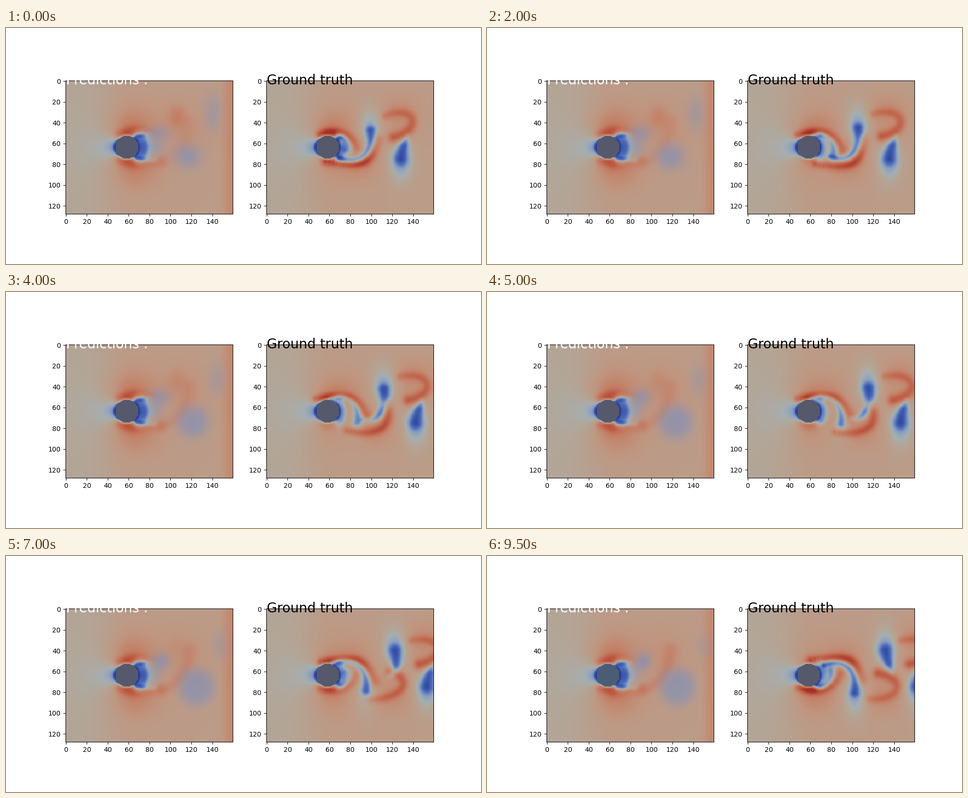
Animation of 989x494 px, one loop 10000 ms. Source, as a matplotlib script:

```python
import numpy as np
import matplotlib.pyplot as plt
from matplotlib.animation import FuncAnimation
from matplotlib.colors import LinearSegmentedColormap

W, H, DPI = 989, 494, 100
FRAMES, INTERVAL = 20, 500
NX, NY = 160, 128
CX, CY, RADIUS = 58, 63.5, 11
SHEDDING = 17  # frames between two eddies, which leave on alternate sides
SPACING = 30   # distance between them downstream

plt.rcParams["font.family"] = "DejaVu Sans"

CMAP = LinearSegmentedColormap.from_list("flow", [
    (0, "#283e94"), (.2, "#4c6aba"), (.35, "#869ec2"), (.45, "#a6aeb1"),
    (.5, "#b2a799"), (.625, "#c09680"), (.75, "#c47a60"), (.875, "#bc5842"),
    (1, "#a63026")], N=512)
HAZE = np.array((120, 143, 194)) / 255
BODY = np.array((86, 88, 108)) / 255
BLUE_BODY = np.array((74, 93, 116)) / 255

X, Y = np.meshgrid(np.arange(NX, dtype=float), np.arange(NY, dtype=float))
DX, DY = X - CX, Y - CY
R = np.hypot(DX, DY)
SOLID = R < RADIUS

# Key points (x, height on the eddy's own side) at ages 0, 1 and 2
RED_PATH = np.array([
    [(50, 12.5), (63, 14.5), (76, 10.5), (84, 1)],
    [(56, 14), (86, 16), (99, 9), (106, -6)],
    [(113, 27), (134, 25), (138, 14), (121, 4)]])
BLUE_PATH = np.array([
    [(69, 9.5), (74, 8.5), (77, 3.5), (77, -2.5)],
    [(69, 10.5), (86, 11.5), (97, 2), (99, -16)],
    [(134, 3), (132, -2), (130, -8), (128, -17)]])


def smoothstep(a, b, x):
    s = np.clip((x - a) / (b - a), 0, 1)
    return s * s * (3 - 2 * s)


def mix(a, b, t):
    return np.asarray(a) * (1 - t) + np.asarray(b) * t


def blob(x, y, sx, sy, power=1):
    q = ((X - x) / sx) ** 2 + ((Y - y) / sy) ** 2
    return np.exp(-(q / 2) ** power)


def stroke(points, widths, amps):
    """Soft tube along a cubic through four points."""
    s = np.linspace(0, 1, 32)
    coef = np.polyfit(np.linspace(0, 1, 4), points, 3)
    px, py = np.polyval(coef[:, 0], s), np.polyval(coef[:, 1], s)
    w = np.interp(s, [0, .5, 1], widths)
    a = np.interp(s, [0, .5, 1], np.clip(amps, .01, 1))
    cost = np.full(X.shape, 50.0)
    for x, y, wi, ai in zip(px, py, w, a):
        q = ((X - x) ** 2 + (Y - y) ** 2) / (2 * wi * wi) - np.log(ai)
        np.minimum(cost, q, out=cost)
    return np.exp(-cost)


def centre(x):
    """Middle line of the wake, which drifts upwards downstream."""
    return CY - 6.5 * smoothstep(98, 130, x)


def path(keys, age, side):
    """Quadratic between the keys, then plain drift with the stream."""
    t = np.clip(age / 2, 0, 1)
    p = (keys[0] * (1 - t) * (1 - 2 * t) + keys[1] * 4 * t * (1 - t)
         + keys[2] * t * (2 * t - 1))
    p[:, 0] += SPACING * max(age - 2, 0)
    p[:, 1] = centre(p[:, 0]) + side * p[:, 1]
    return p


def around_cylinder():
    """Potential flow with a thin slow layer on the wall."""
    r = np.maximum(R, RADIUS)
    p = -RADIUS ** 2 * (DX ** 2 - DY ** 2) / np.maximum(R, 1) ** 2 / r ** 2
    p *= np.where(p > 0, .45, np.where(DX > 0, .1, .85))
    skin = np.exp(-(np.maximum(R - RADIUS, 0) / 1.5) ** 2)
    return .02 + .14 * smoothstep(15, 65, X) + p - .6 * skin


BASE = around_cylinder()


def eddy(age, side):
    """Red shear layer and the blue eddy it wraps, with their wide halos."""
    late = np.clip(age - 1, 0, 1)
    red, blue = path(RED_PATH, age, side), path(BLUE_PATH, age, side)
    v = stroke(red, (2.8, 3.4, 4), (.45 - .2 * late, .65 - .3 * late,
                                    .35 + .2 * late))
    tail = .9 - .55 * smoothstep(1, 1.4, age)
    grow = 1 + .45 * late
    v -= stroke(blue, (2, 2.3 * grow, 3.4 * grow), (tail, .8, .7))

    x, y = red.mean(axis=0)
    v += .2 * blob(x, y + 9 * side, 15, 13)
    x, y = blue[-1]
    halo = .4 * smoothstep(.3, 1.2, age)
    return v - halo * blob(x, y - 6 * side, 7.5, 12)


def truth_field(k):
    v = BASE - .65 * blob(69, CY, 4.5, 9.5, 2)
    for n in range(-1, 3):
        age = k / SHEDDING + n
        side = 1 if n % 2 else -1
        v += smoothstep(-.6, .1, age) * eddy(age, side)
    return v


def steady_prediction():
    v = BASE + .12 * blob(112, 48, 20, 22) + .2 * smoothstep(143, 158, X)
    for side in (-1, 1):
        lower = max(side, 0)
        v += .2 * blob(67 + 4 * lower, CY + 22 * side, 16, 13)
        edge = [(50, 13), (60, 15.5), (70, 16), (80 + 10 * lower, 14)]
        v += .28 * stroke([(x, CY + side * h) for x, h in edge],
                          (3, 4, 4), (.8, 1, .6))
        shear = [(67, 10.5), (71, 11), (75, 11.5), (79 + 5 * lower, 12)]
        v -= stroke([(x, CY + side * h) for x, h in shear],
                    (1.6, 1.6, 2), (.6, .5, .2))
    return v - .85 * blob(70, CY, 6, 10, 2) - .3 * blob(79, CY, 5, 8)


PREDICTED = steady_prediction()

# Faint patches: x, y, width, height, opacity at the start and at the end
PATCHES = [
    ((88, 50, 8, 5, .4), (92, 50, 5, 6, .6)),
    ((84, 63, 7, 7, .4), (84, 60, 5, 7, .3)),
    ((140, 30, 6, 12, .35), (150, 36, 5, 8, .2)),
]


def colours(v, body):
    rgb = CMAP((np.clip(v, -1, 1) + 1) / 2)[..., :3]
    rgb[SOLID] = body
    return rgb


def prediction_rgb(k):
    t = k / (FRAMES - 1)
    streak = stroke([(93, 77), (107, 68), (115, 54), (118, 39)],
                    (4, 4, 5), (.9, 1, .9))
    v = PREDICTED + (.06 + .1 * t) * streak
    v += .2 * (1 - t) * blob(106, 34, 6, 8)
    spread = smoothstep(0, .75, t)
    clear = 1 - .58 * blob(*mix((116, 72, 9, 8), (124.5, 74.5, 12.5, 13), spread),
                           power=1 + spread)
    for start, end in PATCHES:
        *shape, opacity = mix(start, end, t)
        clear = clear * (1 - opacity * blob(*shape))
    rgb = mix(HAZE, colours(v, BODY), clear[..., None])
    rgb[SOLID] = mix(BODY, BLUE_BODY, smoothstep(.75, 1, t))
    return rgb


def truth_rgb(k):
    return colours(truth_field(k), BODY)


# The tiny surplus keeps the pixel size from being rounded down
fig, axes = plt.subplots(1, 2, dpi=DPI, facecolor="white",
                         figsize=((W + 1e-6) / DPI, (H + 1e-6) / DPI))
films = [[make(k) for k in range(FRAMES)] for make in (prediction_rgb, truth_rgb)]
images = []
for ax, film, label, color in zip(axes, films, ("Predictions :", "Ground truth"),
                                  ("white", "black")):
    images.append(ax.imshow(film[0], interpolation="nearest"))
    ax.set_xticks(range(0, 141, 20))
    ax.set_yticks(range(0, 121, 20))
    ax.text(0, 3, label, color=color, fontsize=20)


def update(k):
    for image, film in zip(images, films):
        image.set_data(film[k])
    return images


anim = FuncAnimation(fig, update, frames=FRAMES, interval=INTERVAL,
                     repeat=True, repeat_delay=0, blit=False)
plt.show()
```
